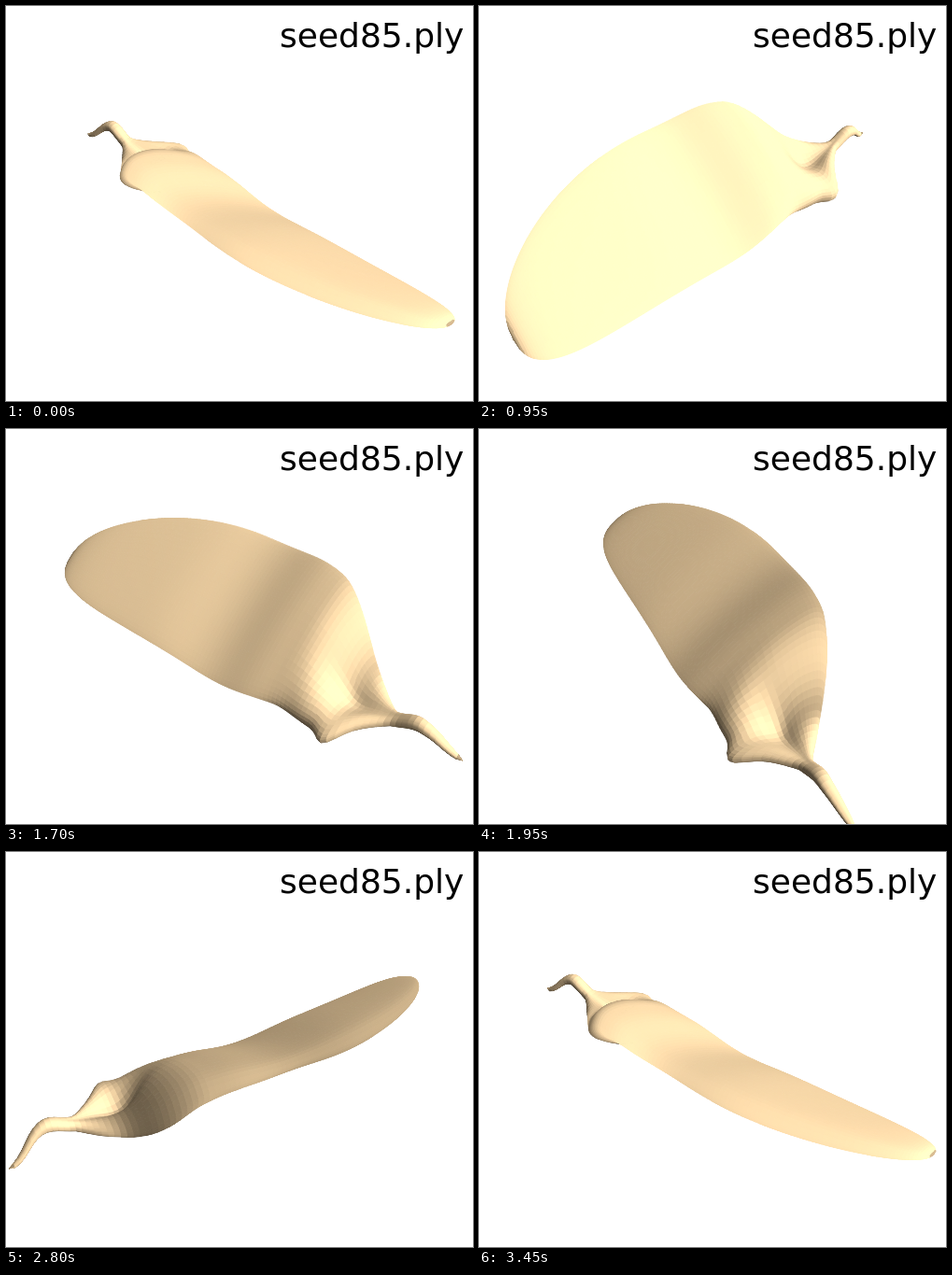
Recreate the animation shown at these times as an HTML page with a canvas. Size 500x423 px, loop 3.5 s.

```html
<!DOCTYPE html>
<html lang="en">
<head>
<meta charset="utf-8">
<title>seed85.ply</title>
<style>
  html, body { margin: 0; width: 500px; height: 423px; overflow: hidden; background: #fff; }
  canvas { display: block; }
</style>
</head>
<body>
<canvas id="stage" width="500" height="423"></canvas>
<script>
const ctx = document.getElementById('stage').getContext('2d');

const STEP_MS = 50, STEPS = 70;
const START_ANGLE = 44 * Math.PI / 180;
const CENTER = { x: 250, y: 212 };
const CAMERA = { distance: 725, sin: 0.675, cos: 0.738 };
const LIGHT = { ambient: 0.53, x: 0.467, y: 0.226, z: 0.45 };
const BASE = [255, 222, 173];
const RINGS = 120, AROUND = 48;
const TIP = 245, WIDEST = 10, ROOT = -190, STEM_END = -257;

const clamp = (v, lo = 0, hi = 1) => Math.min(hi, Math.max(lo, v));
const bell = v => Math.exp(-v * v);
const smooth = v => { v = clamp(v); return v * v * (3 - 2 * v); };
const sub = (p, q) => [p[0] - q[0], p[1] - q[1], p[2] - q[2]];
const cross = (p, q) => [
  p[1] * q[2] - p[2] * q[1],
  p[2] * q[0] - p[0] * q[2],
  p[0] * q[1] - p[1] * q[0]
];
const unit = p => {
  const length = Math.hypot(...p) || 1;
  return p.map(v => v / length);
};
const mix = (p, q, amount) => p.map((v, k) => v * (1 - amount) + q[k] * amount);

// The seed is described along its axis t, from the blade tip to the end of the stem.
function bladeWidth(t) {
  if (t > WIDEST) return 84 * clamp(1 - ((t - WIDEST) / (TIP - WIDEST)) ** 2) ** 0.42;
  return 84 * clamp(1 - ((WIDEST - t) / (WIDEST - ROOT)) ** 2.6);
}

function bladeThickness(t) {
  const waist = 1 - 0.32 * bell((t - WIDEST) / 55);
  return 0.27 * bladeWidth(t) * waist + 9 * bell((t + 110) / 32);
}

const stemRadius = t => 6.5 * Math.sqrt(clamp((t - STEM_END) / 50)) * clamp(-t / 100);
const towardTip = t => (Math.max(0, t - 30) / (TIP - 30)) ** 2;

function centerSide(t) {
  return 22 - 46 * towardTip(t) - 18 * smooth((-70 - t) / 90) + 10 * smooth((-215 - t) / 40);
}

function centerHeight(t) {
  const blade = 4 - 12 * towardTip(t) + 6 * bell((t + 60) / 40);
  const stem = 14 * bell((t + 213) / 20) - 14 * smooth((-225 - t) / 32);
  return blade - 22 * smooth((-75 - t) / 70) + stem;
}

const tilt = t => Math.PI / 5 * smooth((t - ROOT) / 110);

function ringAt(t) {
  const width = Math.hypot(bladeWidth(t), stemRadius(t));
  const thickness = Math.hypot(bladeThickness(t), stemRadius(t));
  const ct = Math.cos(tilt(t)), st = Math.sin(tilt(t));
  return Array.from({ length: AROUND }, (_, j) => {
    const v = j / AROUND * 2 * Math.PI, c = Math.cos(v), s = Math.sin(v);
    // pointed shoulder on one side, crease in the middle
    const across = width * c - 15 * bell((t + 143) / 13) * Math.max(0, -c) ** 2;
    const crease = (s > 0 ? 20 : 12) * bell((t + 140) / 28) * bell((c + 0.05) / 0.4);
    const up = thickness * Math.sign(s) * Math.abs(s) ** 0.75 - crease;
    return [t, centerSide(t) + across * ct - up * st, centerHeight(t) + across * st + up * ct];
  });
}

const rings = Array.from({ length: RINGS + 1 }, (_, i) =>
  ringAt(TIP + (STEM_END - TIP) * (i / RINGS) ** 1.3));

function normalAt(i, j) {
  const before = rings[Math.max(0, i - 1)], after = rings[Math.min(RINGS, i + 1)];
  const alongEdge = sub(after[j], before[j]);
  const aroundEdge = sub(rings[i][(j + 1) % AROUND], rings[i][(j + AROUND - 1) % AROUND]);
  return unit(cross(alongEdge, aroundEdge));
}

// The blade is shaded almost evenly, so its normals lean towards the upper face.
const normals = rings.map((ring, i) => {
  const t = ring[0][0];
  const face = normalAt(i, Math.round(AROUND * 0.18));
  return ring.map((_, j) => {
    const outer = smooth((Math.cos(j / AROUND * 2 * Math.PI) - 0.05) / 0.35);
    const lean = 0.85 * Math.max(smooth((t + 110) / 70), outer * smooth((t + 175) / 35));
    return unit(mix(normalAt(i, j), face, lean));
  });
});

const turn = ([along, side], c, s) => ({ x: along * c - side * s, y: along * s + side * c });

function project(point, c, s) {
  const { x, y } = turn(point, c, s), height = point[2];
  const depth = y * CAMERA.cos + height * CAMERA.sin;
  const k = 1 / (1 - depth / CAMERA.distance);
  return {
    x: CENTER.x + k * x,
    y: CENTER.y + k * (y * CAMERA.sin - height * CAMERA.cos),
    depth
  };
}

function brightness(normal, c, s) {
  const { x, y } = turn(normal, c, s);
  return clamp(LIGHT.ambient + LIGHT.x * x + LIGHT.y * y + LIGHT.z * normal[2], 0.32, 1.18);
}

function visibleFaces(angle) {
  const c = Math.cos(angle), s = Math.sin(angle);
  const points = rings.map(ring => ring.map(p => project(p, c, s)));
  const shades = normals.map(ring => ring.map(n => brightness(n, c, s)));
  const faces = [];
  for (let i = 0; i < RINGS; i++) {
    for (let j = 0; j < AROUND; j++) {
      const n = (j + 1) % AROUND;
      const quad = [points[i][j], points[i + 1][j], points[i + 1][n], points[i][n]];
      const [p, q, r, t] = quad;
      if ((r.x - p.x) * (t.y - q.y) - (r.y - p.y) * (t.x - q.x) <= 0) continue;
      faces.push({
        quad,
        depth: p.depth + q.depth + r.depth + t.depth,
        shade: (shades[i][j] + shades[i + 1][j] + shades[i + 1][n] + shades[i][n]) / 4
      });
    }
  }
  return faces.sort((f, g) => f.depth - g.depth);
}

function draw(step) {
  ctx.fillStyle = '#fff';
  ctx.fillRect(0, 0, 500, 423);
  ctx.lineWidth = 0.9;
  ctx.lineJoin = 'round';
  for (const { quad, shade } of visibleFaces(START_ANGLE + step / STEPS * 2 * Math.PI)) {
    const color = `rgb(${BASE.map(v => Math.min(255, Math.round(v * shade)))})`;
    ctx.fillStyle = ctx.strokeStyle = color;
    ctx.beginPath();
    quad.forEach(p => ctx.lineTo(p.x, p.y));
    ctx.closePath();
    ctx.fill();
    ctx.stroke();
  }
  ctx.fillStyle = '#000';
  ctx.font = '36px "DejaVu Sans", sans-serif';
  ctx.fillText('seed85.ply', 293, 44);
}

const startTime = performance.now();
let shown = -1;
function tick() {
  const step = Math.floor((performance.now() - startTime) / STEP_MS) % STEPS;
  if (step !== shown) draw(shown = step);
  requestAnimationFrame(tick);
}
tick();
</script>
</body>
</html>
```
